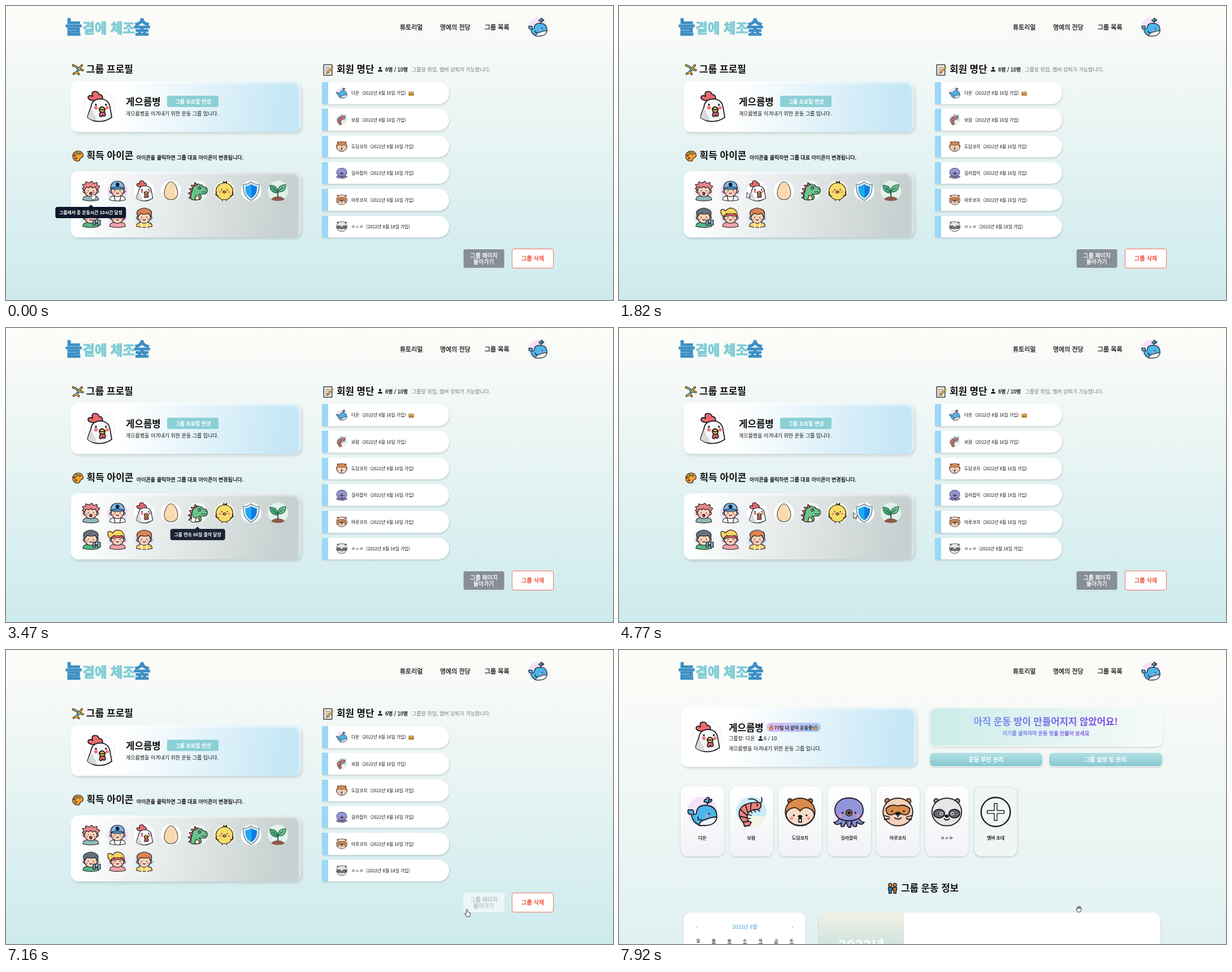
Write an HTML page that moves like this. It is 1074x521 px and loops after 7990 ms.

```html
<!DOCTYPE html>
<html lang="ko">
<head>
<meta charset="utf-8">
<style>
html, body { margin: 0; width: 100%; height: 100%; overflow: hidden; }
body { position: relative; font-family: "Noto Sans CJK KR", "Noto Sans CJK", sans-serif; }
.page, .page > svg, #overlay { position: absolute; left: 0; top: 0; width: 1074px; height: 521px; overflow: hidden; }
#settings { background: linear-gradient(#fdfcf8, #cdeaed); }
#group { background: linear-gradient(#fdfcf8, #e0f1f1); }
.box { position: absolute; box-sizing: border-box; }
.card { border-radius: 13px; box-shadow: 2px 3px 5px #0002, inset -3px 4px 4px #fff9; }
.blue { background: linear-gradient(97deg, #fff 22%, #c4e6f5 94%); }
.gray { background: linear-gradient(100deg, #fff 5%, #c7d0d0 92%); }
.row { border-left: 11px solid #9bd8f6; border-radius: 0 19px 19px 0; background: #fff; box-shadow: 1px 2px 3px #0002; }
.member { border-radius: 13px; background: linear-gradient(#fff, #f1f2f6); box-shadow: 0 1px 3px #0003; }
.action { border: 1px solid #fff; border-radius: 8px; background: linear-gradient(#b4e1e5, #85c8cf); box-shadow: 0 1px 3px #0003; }
.tip { position: absolute; top: 356px; height: 20px; padding: 0 6.7px; transform: translateX(-50%); border-radius: 4px;
  background: #0f172a; color: #fff; font: bold 7.87px/20px "Noto Sans CJK KR", "Noto Sans CJK", sans-serif; white-space: nowrap; }
.tip::before { content: ""; position: absolute; left: 50%; top: -4px; margin-left: -4px; border: solid transparent; border-width: 0 4px 4px; border-bottom-color: #0f172a; }
</style>
</head>
<body>
<div class="page" id="settings"></div>
<div class="page" id="group"></div>
<div id="tips"></div>
<svg id="overlay"><g id="cursor" fill="#fff" stroke="#222" stroke-width=".9" stroke-linejoin="round">
  <path d="M0 0V10.5L2.5 8.3L4 11.6L5.6 10.9L4.1 7.7H7Z"/>
  <path d="M-1.2 1Q-1.2-.2 0-.2T1.2 1V4.6L5.2 5.6Q6.3 6 6 8.6L4.8 13H-.5L-3.7 8.4Q-3.5 6.8-2.3 7.2L-1.2 8.4Z"/>
  <path d="M-2.6 4.6L-4.6 1.2Q-4.4-.4-2.8.6L-3-3Q-2.2-4.6-1.2-3.2Q-.6-6.2.6-4.2Q2-5.8 2.4-3.4Q4.6-4 4.6-1L3.6 3.2L2.6 5.2H-1.8ZM-1.2-3.2V0M.6-4.2V0M2.4-3.4V0"/>
</g></svg>
<script>
const INK = '#1d1d22', SKIN = '#fbd4bb';
const path = (d, fill = 'none', more = '') => `<path d="${d}" fill="${fill}" ${more}/>`;
const circle = (x, y, r, fill, more = '') => `<circle cx="${x}" cy="${y}" r="${r}" fill="${fill}" ${more}/>`;
const oval = (x, y, rx, ry, fill, more = '') => `<ellipse cx="${x}" cy="${y}" rx="${rx}" ry="${ry}" fill="${fill}" ${more}/>`;
const flat = 'stroke="none"';
const disc = fill => circle(0, 0, 18, fill, flat);
const both = (x, y, r, fill, more = flat) => circle(-x, y, r, fill, more) + circle(x, y, r, fill, more);
const eyes = (gap, y, r = 1.1) => both(gap, y, r, INK);
const cheeks = (gap, y, r = 1.8) => both(gap, y, r, '#f48b93');
// A thin outline stands in for the medium and black weights
const embolden = { 500: .028, 900: .05 };
const text = (x, y, size, weight, fill, str, anchor = 'start') =>
  `<text x="${x}" y="${y}" font-size="${size}" font-weight="${weight === 500 ? 400 : weight}" fill="${fill}" stroke="${fill}" stroke-width="${size * (embolden[weight] || 0)}" text-anchor="${anchor}">${str}</text>`;
const box = (x, y, w, h, cls, style = '') =>
  `<div class="box ${cls}" style="left:${x}px;top:${y}px;width:${w}px;height:${h}px;${style}"></div>`;
const repeat = (n, draw) => Array.from({ length: n }, (_, i) => draw(i)).join('');

const person = (bg, shirt, hair, color, extra = '') => disc(bg) +
  path('M-14 16Q-14 9-5 9H5Q14 9 14 16Q8 18 0 18T-14 16Z', shirt) +
  both(11, 1, 2.5, SKIN, '') + oval(0, 0, 11, 10.5, SKIN) +
  path(hair, color) + eyes(4.5, 0, .9) + cheeks(7, 3.5, 1.7) + path('M-2 4Q0 6 2 4') + extra;
const mop = 'M-11-1Q-16-11-8-14Q0-19 8-14Q15-12 12-1Q9-4 8-7Q0-4-6-7Q-9-4-11-1Z';

const art = {
  spiky: person('#faeeee', '#91b9bc', 'M-11-1L-15-4L-12-7L-15-11L-9-12L-9-16L-3-14L2-17L5-13L11-15L11-10L16-8L11-1L8-7L3-5L0-8L-4-5L-8-7Z', '#e9868a',
    oval(0, 5, 2, 2.4, '#c64f58')),
  cap: person('#eae0f5', '#fff', 'M-12-4Q-12-17 0-17T12-4Q0-8-12-4Z', '#79b9ea',
    path('M-13-4Q0-10 13-4Q0-1-13-4Z', '#4f9ad8') + circle(0, -11, 2.8, INK) + path('M-6 10L-4 18M6 10L4 18')),
  chicken: disc('#fff') + path('M-7-7Q-15-8-13-12Q-11-14-8-12Q-10-18-5-18Q-1-18 0-14Q4-15 4-9Z', '#e9696e') +
    path('M-14 13Q-13 8-10 1Q-9-9 2-9Q12-8 13 2L15 13Q8 18 0 18Q-8 18-14 13Z', '#f7f7f7') +
    path('M-14 13Q-12 7-10 2Q-7 5-7 9Q-4 10-3 17Q-9 17-14 13Z', '#d9dade', flat) +
    circle(-4, -2, 1.2, INK, flat) + circle(8, -2, 1.2, INK, flat) + circle(-4, 1.5, 2.2, '#f2777e', flat) + circle(9.5, 1.5, 2, '#f2777e', flat) +
    path('M2 6Q-1 11 1 12Q3 13 4 10Q5 13 7 11Q8 9 6 6Z', '#e9696e') + path('M0 3Q3-2 7 3Q7 7 4 7Q0 7 0 3Z', '#f6be50') + path('M0 3Q4 5 7 3'),
  egg: disc('#fff') + path('M0-16C7-16 12-3 12 4C12 20-12 20-12 4C-12-3-7-16 0-16Z', '#fbd9ae', 'stroke="#555"') + path('M6-9Q9 0 8 7', 'none', 'stroke="#fff3df"'),
  dino: disc('#f1f5f3') + path('M-9 13L-16 13L-12 8L-17 4L-11 2L-15-4L-8-5L-12-10L-6-10L-5-15L1-9Z', '#e76169') +
    path('M-12 15Q-13 7-10 1Q-10-9-1-10Q0-15 4-10Q8-12 9-7Q17-8 17 0Q17 6 10 6H2Q9 9 5 15Q-4 18-12 15Z', '#68c48c') +
    path('M-3 8Q4 9 3 15Q-2 17-5 15Z', '#f7e6a8') + circle(3, -5, 2.2, '#fff') + circle(3.5, -5, 1, INK, flat) + path('M7 2H14M13-3h1'),
  chick: disc('#fdf5da') + path('M-3-13L-1-17L1-14L4-17L4-12', '#f9d65e') + circle(0, 1, 15, '#f9dc68') + path('M-14 2Q-18 9-10 9M14 2Q18 9 10 9M-4 16v2M4 16v2') +
    eyes(5, -2) + cheeks(8, 2, 2) + path('M-3 2Q0-2 3 2Q0 6-3 2Z', '#f29a43'),
  shield: disc('#fff') + path('M0-16Q6-11 14-11C15 4 10 12 0 17C-10 12-15 4-14-11Q-6-11 0-16Z', '#dceaf4', 'stroke="#5a7184"') +
    path('M0-12Q5-8 10-8C11 3 7 9 0 13Z', '#0c7ee0', flat) + path('M0-12Q-5-8-10-8C-11 3-7 9 0 13Z', '#1ca7f5', flat),
  sprout: disc('#dff3ea') + path('M-12 15Q-8 10 0 10T12 15Q8 18 0 18T-12 15Z', '#8b5b4d', flat) + path('M0 11V0', 'none', 'stroke="#2c5a4c" stroke-width="2"') +
    `<g stroke="#2c5a4c">${path('M0 4Q-14 4-14-10Q0-10 0 4Z', '#49a878') + path('M0 2Q0-11 14-11Q14 3 0 2Z', '#67c18c') + path('M0 3L-9-5M0 1L9-6')}</g>`,
  lifter: person('#e8f6f3', '#55b786', mop, '#67707d', path('M5 10H15', 'none', 'stroke-width="2"') + path('M4 5H8V14H4ZM12 5H17V14H12Z', '#7aa9c9')),
  girl: person('#f1e7f5', '#f0a2a8', 'M-10-1Q-18-2-17-13Q-12-16-9-11Q-4-18 4-16Q13-13 12-1Q9-4 8-7Q0-4-7-7Z', '#f8d45f', path('M-11-4Q0-9 12-4L12-1Q0-5-11-1Z', '#e76669')),
  runner: person('#d6ebf9', '#f8d267', mop, '#dc8352', path('M-5 10L-4 18M5 10L4 18', 'none', 'stroke="#f6f6f6" stroke-width="2"')),
  whale: disc('#f4e2f8') + path('M-17 5H17Q12 18 0 18T-17 5Z', '#e1ecfa', flat) +
    path('M6-9Q6-12 2-12Q2-15 5-15Q5-18 8-17Q8-15 7-12Q8-15 11-15Q12-12 7-11Z', '#60bce9') +
    path('M-17-1Q-17-4-14-2Q-11-4-10 0L-11 3Q-9 3-7 2Q-7-8 4-8Q17-7 17 5Q16 16 2 16Q-11 16-13 3Q-17 3-17-1Z', '#4db5e9') +
    path('M-4 16Q-3 10 4 9Q10 6 17 6Q16 16 2 16Z', '#eef4fa') + circle(8, 2, 1, INK, flat) + circle(5, 5, 1.5, '#f194a6', flat) + path('M-5 6Q-6 11-1 9'),
  shrimp: disc('#c9ebf7') + path('M-17 5H17Q12 18 0 18T-17 5Z', '#f7f3e2', flat) + path('M10-9Q14-13 12-17M9-10Q5-17-3-15') +
    path('M-2-3L1 1M2-4L5 0M6-4L10-1M-4 3L0 4M-5 7L-1 8') +
    path('M10-11Q14-6 8-3Q-2-3-4 2Q-6 7-3 11L0 12L-2 16L-8 17L-9 13Q-18 3-12-5Q-6-12 10-11Z', '#ed8180') +
    path('M0-10L-1-3M-7-9L-4 1M-13-3L-5 4M-14 5L-5 7M-10 12L-3 11') + circle(7, -8, 1.1, INK, flat),
  squirrel: disc('#f6e5d5') + both(12, -13, 2.6, '#bd7042', '') + oval(0, 0, 17.5, 16.3, '#dc8a4c') +
    path('M0-1Q-5-8-13-3Q-19 2-15 8Q-9 16 0 16T15 8Q19 2 13-3Q5-8 0-1Z', '#f9dcc6') + eyes(7.5, 4) + cheeks(10, 7.5) + path('M-1.5 8H1.5V12H-1.5Z', '#fff') + oval(0, 5.5, 2, 1.4, INK),
  octopus: disc('#ecdff5') + path('M-11 6Q-14 13-18 12Q-15 17-9 13Q-11 19-6 17L-3 11Q-2 20 2 18L3 11Q4 19 9 17L9 12Q15 17 18 12Q14 13 11 6Z', '#8289cc') +
    path('M-11 8C-21 2-18-16.500 0-16.500S21 2 11 8Q0 13-11 8Z', '#9294d9') + eyes(7.5, 1) + circle(0, 1, 3.6, '#e7a269') + circle(0, 1, 1.6, INK) + cheeks(10, 4.5),
  redpanda: disc('#f5d9ca') + both(12.5, -13, 2.8, '#cf8551', '') + oval(0, 0, 17.5, 16.3, '#f6d1bb') +
    path('M-14-4Q-8-10 0-7Q8-10 14-4Q14 5 6 3Q0-1-6 3Q-14 5-14-4Z', '#dc8a4c') + eyes(7, -1) + oval(0, 2, 2.6, 1.7, INK) + path('M0 4V6M-4 7Q0 10 4 7M-17 4L-10 6M17 4L10 6M-16 9L-10 8M16 9L10 8'),
  panda: disc('#e3e7e3') + both(12.5, -13, 2.6, '#96918c', '') + oval(0, 0, 17.5, 16.3, '#e6e7e5') +
    oval(-9, 2, 6.5, 5, '#68666f') + oval(9, 2, 6.5, 5, '#68666f') + both(6.5, 2, 1.8, '#fff') + eyes(6.5, 2, 1) + oval(0, 5, 2, 1.4, INK) + path('M-3 8Q0 11 3 8'),
  invite: circle(0, 0, 17.2, 'none', 'stroke-width="1.6"') + path('M-1.700-10H1.700V-1.700H10V1.700H1.700V10H-1.700V1.700H-10V-1.700H-1.700Z', 'none', 'stroke-width=".9"'),
  cartwheel: path('M-15-13L-5-9L3-1L13-13M3-1L16 2M3-1L-3 8L-13 14M-3 8L3 15', 'none', 'stroke-width="7"') +
    path('M-5-9L3-1L-3 8', 'none', 'stroke="#36a2dd" stroke-width="4"') + path('M-15-13L-5-9M3-1L13-13M3-1L16 2M-3 8L-13 14M-3 8L3 15', 'none', 'stroke="#f5b52c" stroke-width="3.4"'),
  palette: path('M2 16C-23 18-21-16 1-16C18-16 21 3 12 5C4 5 10 15 2 16Z', '#f4a126', 'stroke-width="2"') +
    circle(-10, -2, 3, '#e24040') + circle(-3, -9, 3, '#57b45d') + circle(6, -8, 3, '#4b9de3') + circle(-6, 7, 3, '#8e5fc4'),
  memo: path('M-14-16H12V17H-14Z', '#f7f3e8', 'stroke-width="2.3"') + path('M-9-8H5M-9-2H3M-9 4H1M-9 10H4') + path('M-2 6L12-10L16-7L2 10L-4 12Z', '#f5ae38'),
  pair: repeat(2, i => `<g transform="translate(${i * 15 - 7.5} 0)" stroke-width="2.6">` + circle(0, -10, 5.5, '#d98b4e') + path('M-6-3H6V7H4V17H-4V7H-6Z', i ? '#b9713a' : '#2f7fb8') + '</g>'),
  user: circle(0, -8, 8, INK, flat) + path('M-16 16Q-15 3 0 3T16 16Z', INK, flat),
  crown: path('M-15 14V-10L-6-2L0-13L6-2L15-10V14Z', '#f3bc37', 'stroke="#8a4f27" stroke-width="3"') + path('M-14 7H14', 'none', 'stroke="#8a4f27" stroke-width="4"'),
  fire: path('M0-17Q1-9 8-5Q15 17 0 17T-9-3L-4-1Q-5-10 0-17Z', '#ef762c') + path('M0 3Q7 10 0 16Q-7 10 0 3Z', '#fbd14b', flat),
};
const icon = (name, x, y, scale = 1) =>
  `<g transform="translate(${x} ${y}) scale(${scale})" stroke="${INK}" stroke-width="1.2" stroke-linejoin="round" stroke-linecap="round">${art[name]}</g>`;

const members = [['whale', '다온'], ['shrimp', '보람'], ['squirrel', '도담코치'], ['octopus', '길라잡이'], ['redpanda', '마루코치'], ['panda', 'ㅇㅅㅇ']];
const slogan = '게으름병을 이겨내기 위한 운동 그룹 입니다.';
const header = text(105, 48.5, 32, 900, '#3d8fc4', '늘') + text(135.5, 48, 23.4, 900, '#83cdd6', '곁에 체조') + text(226, 48.5, 32, 900, '#3d8fc4', '숲') +
  text(697, 41.7, 11, 500, '#222', '튜토리얼') + text(768, 41.7, 11, 500, '#222', '명예의 전당') + text(847, 41.7, 11, 500, '#222', '그룹 목록') + icon('whale', 941, 38, .95);

settings.innerHTML =
  box(115, 133, 407, 90, 'card blue') + box(115, 293, 407, 117, 'card gray') +
  box(285, 159, 91, 20, '', 'background:#8bd0d5;border-radius:3px') +
  repeat(6, i => box(559, 135 + 47.3 * i, 225, 38.500, 'row')) +
  box(809, 430, 73, 35, '', 'background:#fff8;border-radius:4px;box-shadow:0 1px 2px #0001') +
  box(895, 429.500, 74, 35.500, '', 'background:#fff;border:1px solid #f2705c;border-radius:4px') +
  '<svg>' + header +
  icon('cartwheel', 127, 112.5, .55) + text(142, 118, 17, 700, '#111', '그룹 프로필') +
  icon('palette', 127, 266, .56) + text(142.5, 271.2, 17, 700, '#111', '획득 아이콘') +
  text(231, 271.5, 9, 500, '#111', '아이콘을 클릭하면 그룹 대표 아이콘이 변경됩니다.') +
  circle(165, 178, 27, '#fff', 'stroke="#e4e4e4"') + icon('chicken', 165, 178, 1.48) +
  text(212, 175.700, 16.8, 700, '#111', '게으름병') + text(212, 194, 9, 400, '#111', slogan) +
  text(331, 172.5, 9, 700, '#fff', '그룹 프로필 변경', 'middle') +
  ['spiky', 'cap', 'chicken', 'egg', 'dino', 'chick', 'shield', 'sprout'].map((name, i) => icon(name, 150 + 47.3 * i, 327.5)).join('') +
  ['lifter', 'girl', 'runner'].map((name, i) => icon(name, 150 + 47.3 * i, 374.5)).join('') +
  icon('memo', 570, 113, .56) + text(585, 118, 16.8, 700, '#111', '회원 명단') +
  icon('user', 662, 112, .26) + text(671, 115.5, 9, 500, '#111', '6명 / 10명') + text(718, 115.5, 9, 400, '#777', '그룹장 위임, 멤버 강퇴가 가능합니다.') +
  members.map(([name, label], i) => {
    const y = 154.3 + 47.3 * i;
    return icon(name, 594, y, .54) + text(611, y + 3, 7.7, 400, '#111', label) +
      text(616 + label.length * 7.1, y + 3, 7.75, 400, '#111', `(2022년 8월 ${i < 5 ? 16 : 18}일 가입)`);
  }).join('') + icon('crown', 717, 154.5, .27) +
  ['#b2bdc0', '#fff'].map((fill, i) => `<g ${i ? 'id="idle"' : ''}>` + (i ? '<rect x="809.5" y="431" width="72" height="33" rx="3" fill="#868e96"/>' : '') +
    text(845.7, 445.5, 9.9, 500, fill, '그룹 페이지', 'middle') + text(845.2, 456.8, 9.9, 500, fill, '돌아가기', 'middle') + '</g>').join('') +
  text(932, 451, 10.2, 500, '#f04633', '그룹 삭제', 'middle') + '</svg>';

group.innerHTML =
  box(110, 101, 416, 106, 'card blue') +
  box(549, 102, 413, 69, '', 'border:1px solid #fff;border-radius:13px;background:linear-gradient(100deg,#cbece9,#f7fbfa);box-shadow:0 2px 4px #0002') +
  box(549, 181, 201, 26, 'action') + box(760, 181, 202, 26, 'action') +
  box(261, 129, 96, 16, '', 'border-radius:8px;background:linear-gradient(90deg,#dbb9ef,#a3c8f6)') +
  repeat(7, i => box(109 + 86.5 * i, 242, 77, 124, 'member', i === 6 ? 'background:#f0f5f6;border:1px solid #e2e7e9' : '')) +
  box(114, 465, 216, 100, 'member', 'background:#fff') + box(353, 465, 605, 100, 'member', 'background:#fff') +
  box(353, 465, 151, 100, '', 'border-radius:13px 0 0;background:linear-gradient(#f3f0e4,#cfe3df 60%)') +
  '<svg><defs><linearGradient id="violet"><stop stop-color="#7896ee"/><stop offset=".5" stop-color="#766be9"/><stop offset="1" stop-color="#8147e5"/></linearGradient></defs>' + header +
  circle(156, 154, 26.5, '#fff', 'stroke="#dedede"') + icon('chicken', 156, 154, 1.46) +
  text(194, 144, 16.8, 700, '#111', '게으름병') + icon('fire', 269.5, 137.5, .28) + icon('fire', 348.5, 137.5, .28) +
  text(310, 140.8, 8, 700, '#222', '77일 다 같이 운동중!', 'middle') +
  text(194, 160.3, 9, 400, '#111', '그룹장: 다온') + icon('user', 250.5, 156.5, .26) + text(256, 160.3, 9, 400, '#111', '6 / 10') + text(194, 178.3, 9, 400, '#111', slogan) +
  text(755, 133, 16.7, 700, 'url(#violet)', '아직 운동 방이 만들어지지 않았어요!', 'middle') +
  text(755.5, 151.3, 9, 500, 'url(#violet)', '여기를 클릭하여 운동 방을 만들어 보세요', 'middle') +
  text(649.5, 198, 10.2, 700, '#fff', '운동 루틴 관리', 'middle') + text(860.5, 198, 10.2, 700, '#fff', '그룹 설정 및 관리', 'middle') +
  [...members, ['invite', '멤버 초대']].map(([name, label], i) => icon(name, 147.5 + 86.5 * i, 287, 1.5) + text(147.5 + 86.5 * i, 336, 7.9, 500, '#111', label, 'middle')).join('') +
  icon('pair', 484, 422, .55) + text(499, 427.800, 16.8, 700, '#111', '그룹 운동 정보') +
  text(222.5, 494.3, 9, 400, '#3f9fd0', '2022년 8월', 'middle') + text(138, 494, 9, 400, '#3f9fd0', '‹', 'middle') + text(307, 494, 9, 400, '#3f9fd0', '›', 'middle') +
  [...'일월화수목금토'].map((day, i) => text(140 + 27.6 * i, 518, 7, 500, '#222', day, 'middle') + (i ? path(`M${136.5 + 27.6 * i} 520.5h7`, 'none', 'stroke="#222"') : '')).join('') +
  text(429, 533, 25, 700, '#fff', '2022년', 'middle') + '</svg>';

// Icon column, label, shown from, shown until
const tipList = [
  [0, '그룹에서 총 운동시간 10시간 달성', -500, 760],
  [1, '그룹에서 총 운동시간 100시간 달성', 1080, 1690],
  [2, '그룹 연속 30일 출석 달성', 1950, 2460],
  [3, '그룹 연속 3일 출석 달성', 2640, 3200],
  [4, '그룹 연속 66일 출석 달성', 3330, 3970],
  [5, '그룹 연속 7일 출석 달성', 4180, 4690],
  [6, '그룹 최초 가입 달성', 4880, 5400],
].map(([column, label, from, until]) => {
  const node = document.createElement('div');
  node.className = 'tip';
  node.textContent = label;
  node.style.left = 150 + 47.3 * column + 'px';
  tips.append(node);
  return { node, from, until };
});

// Cursor tip: time, x, y
const route = [
  [0, 153, 330], [720, 153, 330], [1000, 180, 330], [1350, 199, 331], [1680, 199, 331], [1820, 226, 330], [2030, 245, 332],
  [2440, 245, 332], [2850, 288, 331], [3190, 288, 331], [3470, 329.5, 331], [3610, 334, 331], [3950, 334, 331], [4300, 385, 329],
  [4700, 385, 329], [4770, 415, 327], [5120, 431, 326], [5380, 431, 326], [5730, 453, 430], [5860, 453, 430],
  [6140, 648, 450], [6300, 755, 456], [6480, 807, 459], [6690, 815.5, 459.5], [7990, 815.5, 459.5],
];
const clamp = v => Math.max(0, Math.min(1, v));
function cursorAt(t) {
  const i = Math.max(1, route.findIndex(key => key[0] > t));
  const [a, b] = [route[i - 1], route[i]], k = (t - a[0]) / (b[0] - a[0]);
  return [a[1] + (b[1] - a[1]) * k, a[2] + (b[2] - a[2]) * k];
}

function draw() {
  const t = performance.now() % 7990;
  group.style.visibility = t >= 7230 ? 'visible' : 'hidden';
  idle.setAttribute('opacity', 1 - clamp((t - 6450) / 240));
  for (const { node, from, until } of tipList)
    node.style.opacity = Math.min(clamp((t - from) / 150), clamp((until + 80 - t) / 80));

  let [x, y] = cursorAt(t);
  const offset = ((x - 150 + 23.65) % 47.3) - 23.65;
  const overIcon = y < 346 && Math.hypot(offset, y - 327.5) < 17;
  const shape = t >= 7850 ? 2 : overIcon || t >= 6830 ? 1 : 0;
  if (shape === 2) [x, y] = [813.5, 459];
  cursor.setAttribute('transform', `translate(${x} ${y})`);
  [...cursor.children].forEach((node, i) => node.setAttribute('visibility', i === shape ? 'visible' : 'hidden'));
  requestAnimationFrame(draw);
}
draw();
</script>
</body>
</html>
```
